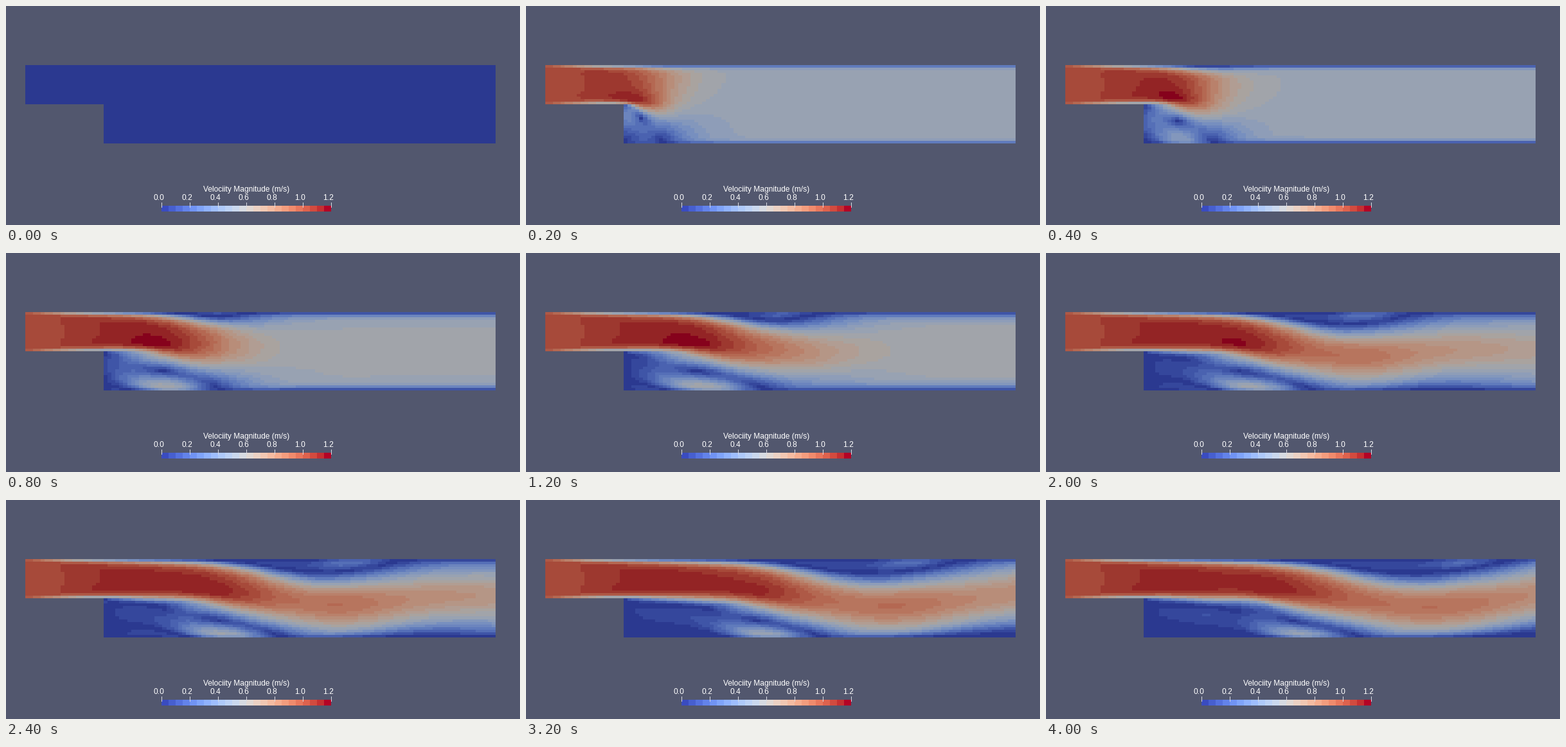
A matplotlib script for the animation above (4200 ms loop, 800 by 341 pixels).

```python
import numpy as np
import matplotlib.pyplot as plt
from matplotlib.animation import FuncAnimation

# Channel with a backward-facing step, solved on a staggered grid
NX, NY = 120, 30
STEP_X, STEP_Y = 20, 15
DX, DY = 12 / NX, 2 / NY
VISCOSITY = 0.001
DT = 0.025
FRAMES, FRAME_TIME = 21, 2.0

fluid = np.ones((NX, NY), bool)
fluid[:STEP_X, :STEP_Y] = False
open_u = np.zeros((NX + 1, NY))
open_u[1:-1] = fluid[1:] & fluid[:-1]
open_u[-1] = 1
open_v = np.zeros((NX, NY + 1))
open_v[:, 1:-1] = fluid[:, 1:] & fluid[:, :-1]
inlet = np.zeros((NX + 1, NY))
inlet[0, STEP_Y:] = 1


def factor_pressure():
    """Inverted diagonal blocks of the pressure matrix, column by column."""
    links = open_u / DX**2
    blocks = []
    for i in range(NX):
        wy = open_v[i] / DY**2
        diagonal = links[i] + links[i + 1] + wy[:-1] + wy[1:]
        diagonal[~fluid[i]] = 1
        block = np.diag(diagonal) - np.diag(wy[1:-1], 1) - np.diag(wy[1:-1], -1)
        if i:
            block -= links[i][:, None] * blocks[-1] * links[i]
        blocks.append(np.linalg.inv(block))
    return links, blocks


LINKS, BLOCKS = factor_pressure()


def solve_pressure(rhs):
    p = np.empty_like(rhs)
    p[0] = BLOCKS[0] @ rhs[0]
    for i in range(1, NX):
        p[i] = BLOCKS[i] @ (rhs[i] + LINKS[i] * p[i - 1])
    for i in range(NX - 2, -1, -1):
        p[i] += BLOCKS[i] @ (LINKS[i + 1] * p[i + 1])
    return p


def flux(a, b, carrier, spacing):
    return carrier * np.where(carrier > 0, a, b) - VISCOSITY * (b - a) / spacing


def rate(q, cx, cy):
    fx = flux(q[:-1, 1:-1], q[1:, 1:-1], cx, DX)
    fy = flux(q[1:-1, :-1], q[1:-1, 1:], cy, DY)
    return -np.diff(fx, axis=0) / DX - np.diff(fy, axis=1) / DY


def advance(u, v):
    # no-slip ghost values inside the step and around the channel
    u[:STEP_X, STEP_Y - 1] = -u[:STEP_X, STEP_Y]
    v[STEP_X - 1, :STEP_Y] = -v[STEP_X, :STEP_Y]
    U, V = np.pad(u, 1, mode="edge"), np.pad(v, 1, mode="edge")
    U[:, 0], U[:, -1] = -U[:, 1], -U[:, -2]
    V[0] = -V[1]

    du = rate(U, (U[:-1, 1:-1] + U[1:, 1:-1]) / 2, (V[:-1, 1:-1] + V[1:, 1:-1]) / 2)
    dv = rate(V, (U[1:-1, :-1] + U[1:-1, 1:]) / 2, (V[1:-1, :-1] + V[1:-1, 1:]) / 2)
    u = (u + DT * du) * open_u + inlet
    v = (v + DT * dv) * open_v

    divergence = np.diff(u, axis=0) / DX + np.diff(v, axis=1) / DY
    p = solve_pressure(-divergence * fluid)
    u[1:-1] -= open_u[1:-1] * np.diff(p, axis=0) / DX
    u[-1] += p[-1] / DX
    v[:, 1:-1] -= open_v[:, 1:-1] * np.diff(p, axis=1) / DY
    return u, v


def simulate():
    u, v = np.zeros((NX + 1, NY)), np.zeros((NX, NY + 1))
    speeds = [np.zeros((NX, NY))]
    for _ in range(FRAMES - 1):
        for _ in range(round(FRAME_TIME / DT)):
            u, v = advance(u, v)
        speeds.append(np.hypot((u[1:] + u[:-1]) / 2, (v[:, 1:] + v[:, :-1]) / 2))
    return speeds


SPEEDS = simulate()

# Drawing
W, H, DPI = 800, 341, 100
BANDS, TOP_SPEED, SHADE = 24, 1.2, 0.75
PALETTE = plt.get_cmap("coolwarm")(np.linspace(0, 1, BANDS))[:, :3]

fig = plt.figure(figsize=(W / DPI, H / DPI), dpi=DPI, facecolor="#52576e")
ax = fig.add_axes([0, 0, 1, 1])
ax.axis("off")


def field_image(speed):
    band = np.clip((speed / TOP_SPEED * BANDS).astype(int), 0, BANDS - 1)
    image = np.dstack([PALETTE[band] * SHADE, fluid])
    return image.transpose(1, 0, 2)


field = ax.imshow(field_image(SPEEDS[0]), extent=(30.4, 762, 213.8, 91.8),
                  origin="lower", interpolation="nearest", aspect="auto")
ax.imshow(PALETTE[None], extent=(242, 506, 320, 311),
          interpolation="nearest", aspect="auto")
ax.set(xlim=(0, W), ylim=(H, 0))

label = dict(color="white", family="Liberation Sans", size=12 * 72 / DPI,
             ha="center", va="baseline")
ax.text(374.5, 289, "Velociity Magnitude (m/s)", **label)
for k in range(7):
    x = 242 + 44 * k
    ax.text(x - 4.5, 302, f"{0.2 * k:.1f}", **label)
    ax.plot([x, x], [306, 313], color="#d8dae2", lw=0.72)


def draw(n):
    field.set_data(field_image(SPEEDS[n]))
    return [field]


animation = FuncAnimation(fig, draw, frames=FRAMES, interval=200,
                          repeat=True, repeat_delay=0)
plt.show()
```
